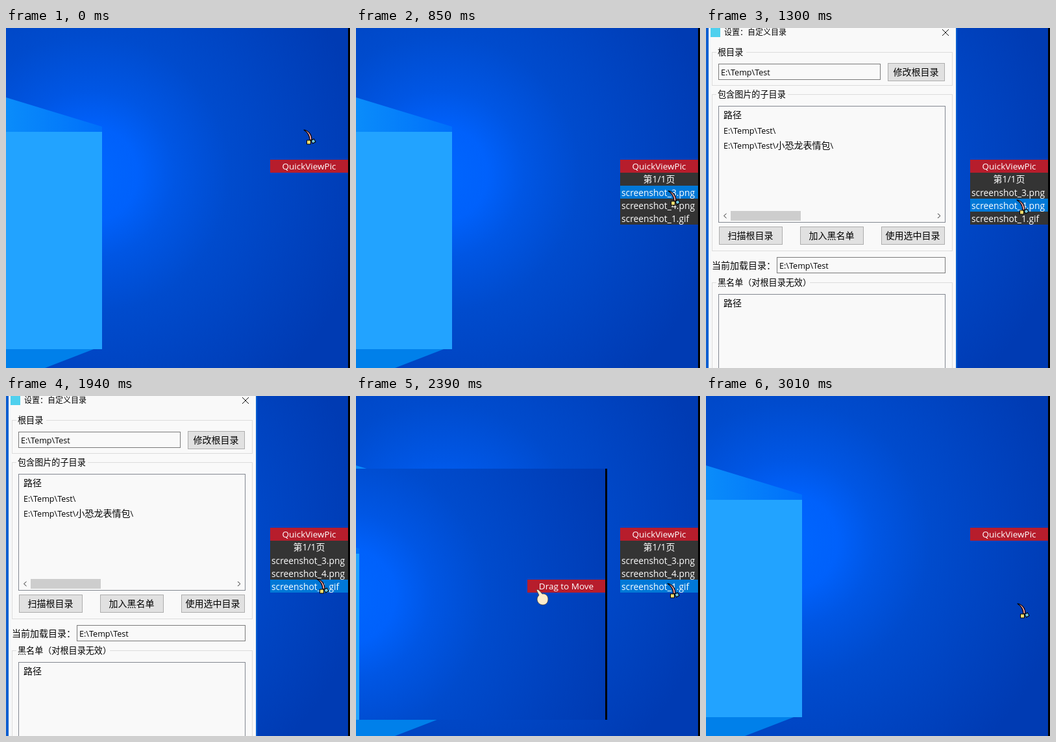
An HTML page that plays this animation: 530 px wide and 524 px high, repeating every 3320 ms.

```html
<!DOCTYPE html>
<html lang="zh-CN">
<head>
<meta charset="utf-8">
<title>Picture list preview</title>
<style>
  html, body { margin: 0; width: 100%; height: 100%; overflow: hidden; background: #0046c4; }
  svg { display: block; width: 530px; height: 524px; }
  text { font-family: "Open Sans", "Noto Sans CJK SC", "Noto Sans CJK", sans-serif; font-size: 14px; fill: #000; white-space: pre; }
  .mid { text-anchor: middle; }
  .menu text { fill: #fff; }
  .head { font-size: 13.5px; }
  .item { font-size: 13.8px; }
  .small { font-size: 12px; }
  .group { font-size: 13.1px; }
  .path { font-size: 12.6px; }
  .line { fill: none; stroke: #333; }
</style>
</head>
<body>
<svg id="stage" viewBox="0 0 530 524" xmlns="http://www.w3.org/2000/svg">
  <defs>
    <radialGradient id="sky" gradientUnits="userSpaceOnUse" cx="130" cy="225" r="430">
      <stop offset="0" stop-color="#0066ff"/>
      <stop offset=".17" stop-color="#0061fb"/>
      <stop offset=".3" stop-color="#0056e4"/>
      <stop offset=".5" stop-color="#004bcd"/>
      <stop offset=".75" stop-color="#0043c0"/>
      <stop offset="1" stop-color="#003bb3"/>
    </radialGradient>
    <linearGradient id="beam">
      <stop offset="0" stop-color="#0a8cfa"/>
      <stop offset="1" stop-color="#0070fa"/>
    </linearGradient>
    <clipPath id="clip"><rect y="112" width="387" height="387"/></clipPath>
    <g id="wall">
      <rect width="530" height="524" fill="url(#sky)"/>
      <path d="M0 107L148 152V162H0Z" fill="url(#beam)"/>
      <path d="M0 490H148L60 524H0Z" fill="#0080ea"/>
      <rect x="-187" y="160" width="335" height="335" fill="#22a3ff"/>
      <rect x="527" width="3" height="524" fill="#000"/>
    </g>
    <g id="pen" stroke="#000" stroke-linejoin="round">
      <path d="M0 0C7 1 12 7 12 15L9 16C9 9 6 4 0 0Z" fill="#f5a3a8" stroke-width="1.2"/>
      <rect x="4.5" y="16" width="6" height="6" fill="#f2dc6e"/>
      <rect x="-2.6" y="-2.6" width="5.2" height="5.2" fill="#6cc5e0" transform="translate(14.5 17.5) rotate(-30)"/>
    </g>
    <path id="hand" d="M0 1C2-1 4 1 9 7C14 6 18 10 18 15C18 21 14 24 10 24C5 24 1 20 1 15C1 12 3 10 4 9Z"
          fill="#fdeccb" stroke="#4a3a30" stroke-width=".8"/>
  </defs>
</svg>
<script>
const LOOP = 3320;
const STEPS = [0, 90, 180, 270, 360, 450, 560, 670, 760, 850, 940, 1030, 1120, 1210, 1300, 1660,
  1750, 1840, 1940, 2030, 2120, 2210, 2300, 2390, 2480, 2570, 2660, 2740, 2830, 2920, 3010];
// time, x, y of the pointer tip
const MAIN_PATH = [[0, 459, 157], [360, 468, 207], [850, 481, 251], [1210, 479, 261], [1300, 479, 265],
  [1660, 479, 265], [1940, 479, 282], [2030, 480, 288], [2660, 480, 290], [2740, 480, 300], [3010, 480, 320]];
const INNER_PATH = [[2030, 213, 302], [2120, 213, 302], [2480, 300, 296], [2660, 326, 293], [2740, 327, 293]];
// time, visible preview
const PREVIEWS = [[0, ""], [940, "options"], [1300, "folders"], [2030, "clip"], [2920, ""]];
const FILES = ["screenshot_3.png", "screenshot_4.png", "screenshot_1.gif"];

const stage = document.getElementById("stage");
const raw = String.raw;
const $ = id => document.getElementById(id);

const text = (x, y, s, cls = "") => `<text x="${x}" y="${y}" class="${cls}">${s}</text>`;
const box = (x, y, w, h, fill, stroke = "none") =>
  `<rect x="${x + .5}" y="${y + .5}" width="${w}" height="${h}" fill="${fill}" stroke="${stroke}"/>`;
const fill = (x, y, w, h, color) => `<rect x="${x}" y="${y}" width="${w}" height="${h}" fill="${color}"/>`;
const button = (x, y, w, h, s) =>
  box(x, y, w, h, "#e1e1e1", "#adadad") + text(x + w / 2, y + h / 2 + 5, s, "mid");
const line = (d, color = "#333") => `<path d="${d}" class="line" style="stroke:${color}"/>`;
const frame = (y, h, s, w) =>
  box(9, y, 370, h, "none", "#dcdcdc") + fill(16, y - 2, w, 5, "#f9f9f9") + text(18, y + 5, s, "group");

function menu(id, dx, dy) {
  const rows = FILES.map((f, i) => text(409, 259 + i * 20, f, "item")).join("");
  return `<g id="${id}" class="menu" transform="translate(${dx} ${dy})">
    ${fill(407, 203, 120, 20, "#b71d2c")}
    <text id="${id}Head" x="467" y="218" class="mid head"></text>
    <g id="${id}List">${fill(407, 223, 120, 80, "#343434")}
      <rect id="${id}Hot" x="407" width="120" height="20" fill="#0078d7"/>
      ${text(467, 238, "第1/1页", "mid")}${rows}</g></g>`;
}

function options() {
  const bg = "#f2f2f2";
  return `<g id="options">` + box(-2, 208, 388, 195, bg, "#c4c8cf") +
    fill(-6, 214, 10, 13, "#4fd0ee") + text(9, 224, "其它设置", "small\" style=\"fill:#999") +
    line("M366 215l10 10m0-10l-10 10", "#999") +
    text(21, 261, "主题颜色：") + text(13, 291, "每页项目数：") +
    text(21, 325, "列表宽度：") + text(7, 358, "鼠标快捷操作：") +
    `<circle cx="118" cy="257.5" r="6" fill="#fff" stroke="#333"/>
     <circle cx="182.500" cy="257.5" r="6" fill="#fff" stroke="#333"/>
     <circle cx="182.500" cy="257.5" r="3.300" fill="#333"/>` +
    text(128, 263, "浅色") + text(193, 263, "深色") +
    box(111, 274, 49, 25, "#e1e1e1", "#adadad") + text(115, 292, "20") + line("M147 285l4.500 4 4.500-4") +
    box(111, 308, 49, 24, bg, "#7a7a7a") + text(116, 326, "120") +
    box(111, 349, 12, 12, "#fff", "#333") + text(128, 361, "启用右键一键复制") +
    box(111, 374, 12, 12, "#fff", "#333") + line("M114 380l3 3 5-6") + text(128, 386, "启用滚轮翻页") +
    button(257, 249, 117, 27, "自定义目录") + button(257, 284, 117, 27, "自定义图片列表") +
    button(257, 319, 117, 27, "剪贴板") + button(257, 354, 117, 37, "保存并应用") + `</g>`;
}

function folders() {
  const bg = "#f9f9f9", edge = "#828790";
  const root = raw`E:\Temp\Test`;
  return `<g id="folders">` + fill(0, 0, 387, 524, "#0a5ed0") + fill(4, 0, 381, 524, bg) +
    fill(7, 0, 15, 14, "#4fd0ee") + text(28, 11, "设置：自定义目录", "small") + line("M364 2l10 10m0-10l-10 10", "#111") +
    frame(37, 51, "根目录", 46) + box(19, 55, 249, 24, bg, "#7a7a7a") + text(23, 73, root, "path") +
    button(280, 54, 87, 27, "修改根目录") +
    frame(102, 241, "包含图片的子目录", 110) + box(19, 120, 349, 179, bg, edge) +
    text(27, 139, "路径") + text(27, 163, root + "\\", "path") +
    text(27, 186, `${root}\\<tspan font-size="14" style="font-size:14px">小恐龙表情包</tspan>\\`, "path") +
    fill(38, 282, 108, 15, "#cdcdcd") + line("M31.500 286l-4 3.500 4 3.500M357 286l4 3.500-4 3.500") +
    button(20, 306, 97, 27, "扫描根目录") + button(145, 306, 97, 27, "加入黑名单") +
    button(270, 306, 97, 27, "使用选中目录") +
    text(9, 371, "当前加载目录：") + box(109, 353, 259, 24, bg, "#7a7a7a") + text(113, 371, root, "path") +
    frame(392, 140, "黑名单（对根目录无效）", 144) + box(19, 410, 349, 130, bg, edge) +
    text(27, 429, "路径") + `</g>`;
}

const clip = () => `<g id="clipView" clip-path="url(#clip)">
  <use href="#wall" x="-143" y="83"/>${menu("inner", -143, 80)}<use id="innerTip"/></g>`;

stage.insertAdjacentHTML("beforeend",
  `<use href="#wall"/>${options()}${folders()}${clip()}${menu("main", 0, 0)}<use id="mainTip"/>`);

function at(path, t) {
  const i = path.findIndex(p => p[0] > t);
  if (i < 0) return path[path.length - 1].slice(1);
  if (i === 0) return path[0].slice(1);
  const a = path[i - 1], b = path[i], k = (t - a[0]) / (b[0] - a[0]);
  return [1, 2].map(n => Math.round(a[n] + (b[n] - a[n]) * k));
}

const show = (id, on) => $(id).setAttribute("visibility", on ? "inherit" : "hidden");

function pose(id, [x, y], dx, dy, open) {
  const px = x - dx, py = y - dy;
  const inside = px >= 407 && px < 527;
  const drag = inside && py >= 203 && py < 223;
  const row = Math.floor((py + 1 - 243) / 20);
  $(id + "Head").textContent = drag ? "Drag to Move" : "QuickViewPic";
  show(id + "List", open);
  show(id + "Hot", open && inside && row >= 0 && row < 3);
  $(id + "Hot").setAttribute("y", 243 + row * 20);
  const tip = $(id + "Tip");
  tip.setAttribute("href", drag ? "#hand" : "#pen");
  tip.setAttribute("x", x);
  tip.setAttribute("y", y);
}

const last = (list, t) => list.filter(v => (v[0] ?? v) <= t).pop();
const start = performance.now();
let drawn = -1;

function draw() {
  const t = last(STEPS, (performance.now() - start) % LOOP);
  if (t !== drawn) {
    const view = last(PREVIEWS, t)[1];
    $("options").style.display = view === "options" ? "" : "none";
    $("folders").style.display = view === "folders" ? "" : "none";
    $("clipView").style.display = view === "clip" ? "" : "none";
    pose("main", at(MAIN_PATH, t), 0, 0, t >= 360 && t < 3010);
    pose("inner", at(INNER_PATH, t), -143, 80, t >= 2480);
    drawn = t;
  }
  requestAnimationFrame(draw);
}
draw();
</script>
</body>
</html>
```
